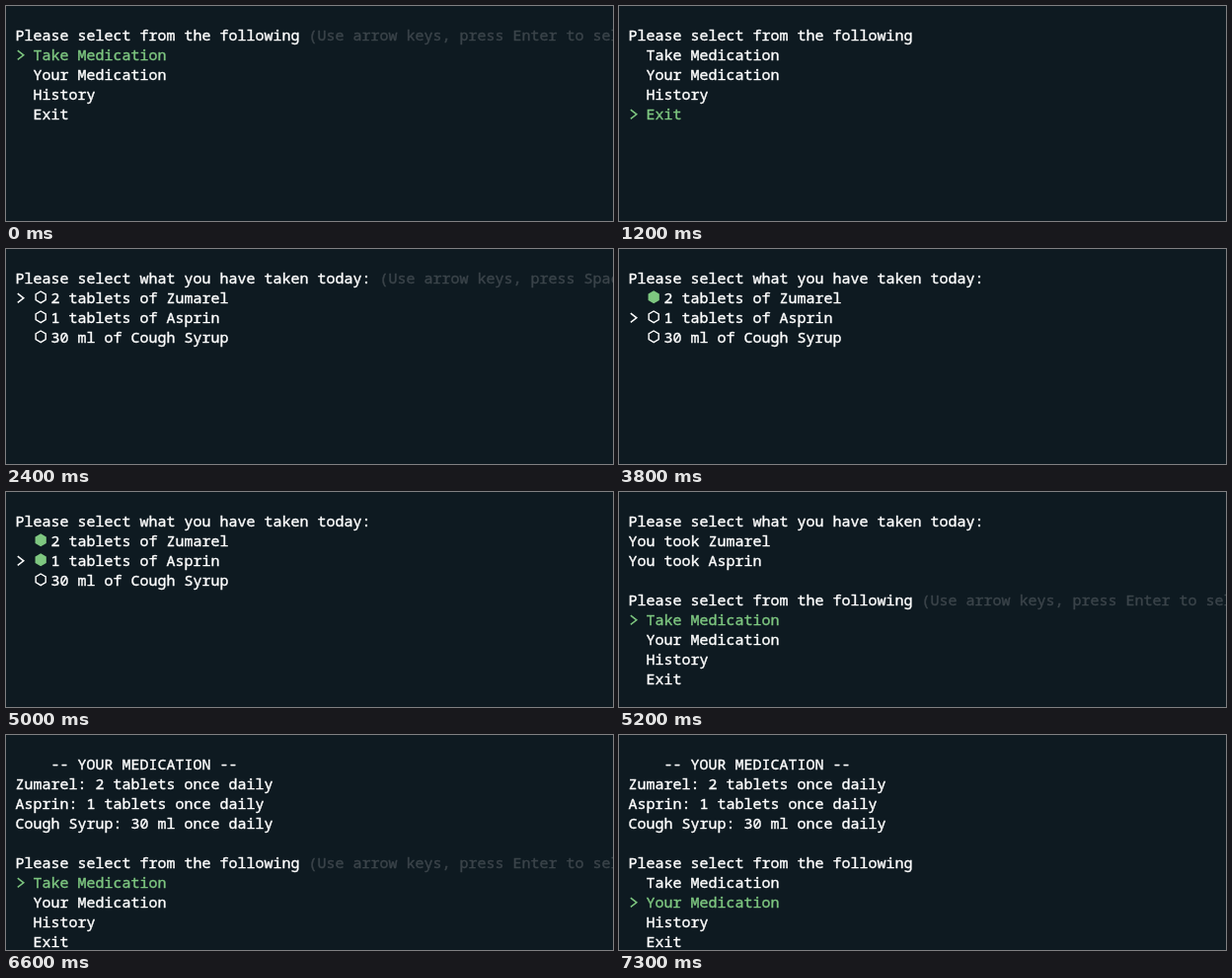
Recreate the animation shown at these times as an HTML page. Size 615 by 218 pixels, loop 8 s.

```html
<!DOCTYPE html>
<html lang="en">
<head>
<meta charset="utf-8">
<title>Medication prompt</title>
<style>
  html, body { margin: 0; width: 100%; height: 100%; overflow: hidden; background: #0e1a21; }
  svg { display: block; width: 615px; height: 218px; }
  text {
    font: 15px "Noto Sans Mono", "DejaVu Sans Mono", monospace;
    white-space: pre;
    stroke-width: 0.4px;
  }
</style>
</head>
<body>
<svg id="term" viewBox="0 0 615 218"></svg>
<script>
const NS = "http://www.w3.org/2000/svg";
const term = document.getElementById("term");
const LOOP = 8000, LEFT = 9.6, COL = 9, BASE = 34.6, ROW = 20;
const WHITE = "#ffffff", GREEN = "#7ec780", GREY = "#3b444a";

const MENU = ["Take Medication", "Your Medication", "History", "Exit"];
const DOSES = ["2 tablets of Zumarel", "1 tablets of Asprin", "30 ml of Cough Syrup"];
const TAKE_TITLE = "Please select what you have taken today:";
const TAKEN = [TAKE_TITLE, "You took Zumarel", "You took Asprin"];
const LIST = ["Zumarel: 2 tablets once daily", "Asprin: 1 tablets once daily",
              "Cough Syrup: 30 ml once daily"];

function add(tag, attrs) {
  const el = document.createElementNS(NS, tag);
  for (const key in attrs) el.setAttribute(key, attrs[key]);
  return term.appendChild(el);
}

function write(row, col, str, color = WHITE) {
  const at = { x: LEFT + col * COL, y: BASE + row * ROW, fill: color, stroke: color };
  add("text", at).textContent = str;
}

function hexagon(row, on) {
  const cx = 35.2, cy = BASE + row * ROW - 5.8, r = on ? 6.5 : 5.8;
  const points = Array.from({ length: 6 }, (_, i) => {
    const a = (i * 60 - 90) * Math.PI / 180;
    return (cx + r * Math.cos(a)).toFixed(2) + "," + (cy + r * Math.sin(a)).toFixed(2);
  }).join(" ");
  add("polygon", on ? { points, fill: GREEN }
                    : { points, fill: "none", stroke: WHITE, "stroke-width": 1.4 });
}

function pointer(row, color) {
  const x = LEFT + 2.2, y = BASE + row * ROW - 9.4;
  add("path", { d: `M${x} ${y}l6 4.6l-6 4.6`, fill: "none", stroke: color, "stroke-width": 1.5 });
}

function menu(top, active, hint) {
  write(top, 0, "Please select from the following");
  if (hint) write(top, 33, "(Use arrow keys, press Enter to select)", GREY);
  MENU.forEach((label, i) => {
    const row = top + 1 + i, on = i === active;
    if (on) pointer(row, GREEN);
    write(row, 2, label, on ? GREEN : WHITE);
  });
}

function checklist(active, count, hint) {
  write(0, 0, TAKE_TITLE);
  if (hint) write(0, 41, "(Use arrow keys, press Space to select and Enter to finish)", GREY);
  DOSES.forEach((label, i) => {
    if (i === active) pointer(i + 1, WHITE);
    hexagon(i + 1, i < count);
    write(i + 1, 4, label);
  });
}

function taken(active, hint) {
  TAKEN.forEach((line, i) => write(i, 0, line));
  menu(4, active, hint);
}

function overview(active, hint) {
  write(0, 4, "-- YOUR MEDICATION --");
  LIST.forEach((line, i) => write(i + 1, 0, line));
  menu(5, active, hint);
}

// start time, screen, arguments
const STEPS = [
  [0, menu, 0, 0, true],
  [600, menu, 0, 1],
  [900, menu, 0, 2],
  [1200, menu, 0, 3],
  [1800, menu, 0, 1],
  [2200, menu, 0, 0],
  [2400, checklist, 0, 0, true],
  [3200, checklist, 0, 1],
  [3800, checklist, 1, 1],
  [5000, checklist, 1, 2],
  [5200, taken, 0, true],
  [5900, taken, 1],
  [6600, overview, 0, true],
  [7300, overview, 1]
];

let shown = null;
function render(t) {
  const step = STEPS.filter(s => s[0] <= t).pop();
  if (step === shown) return;
  shown = step;
  term.replaceChildren();
  add("rect", { width: 615, height: 218, fill: "#0e1a21" });
  const [, screen, ...args] = step;
  screen(...args);
}

function tick() {
  render(performance.now() % LOOP);
  requestAnimationFrame(tick);
}
tick();
</script>
</body>
</html>
```
